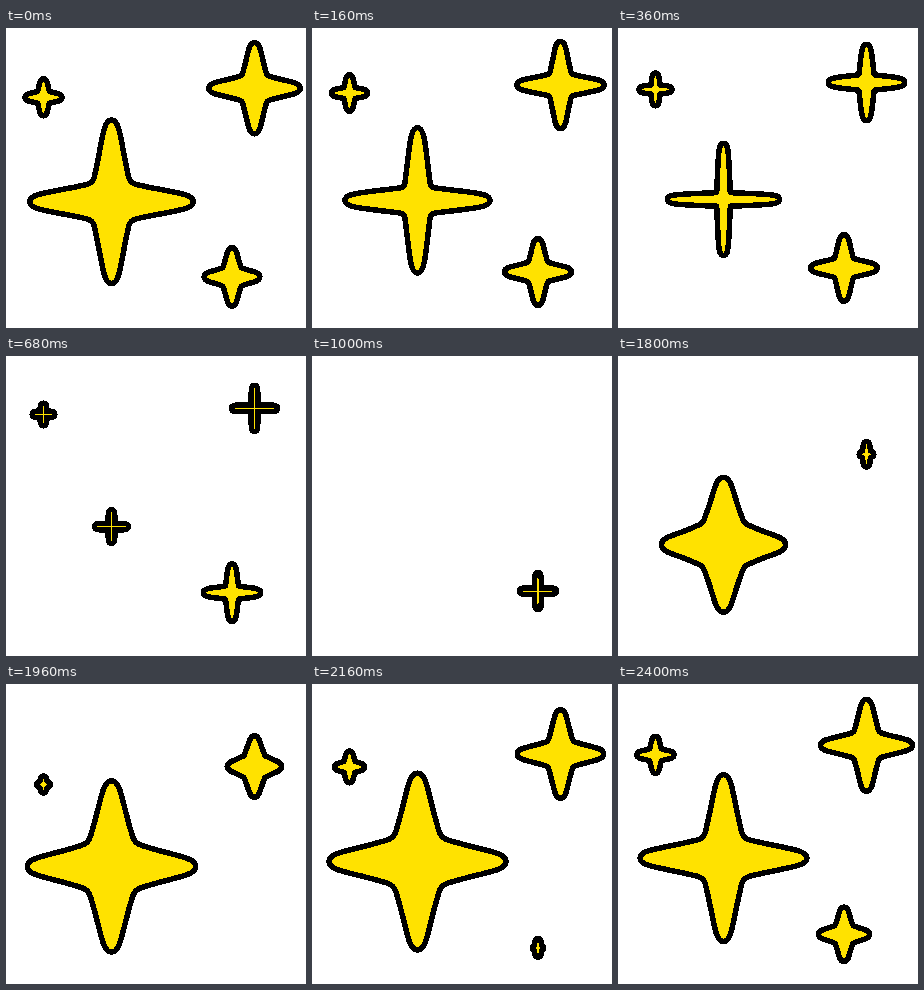
Write an HTML page that moves like this. It is 300x300 px and loops after 2.44 s.

```html
<!DOCTYPE html>
<html lang="en">
<head>
<meta charset="utf-8">
<title>Sparkles</title>
<style>
  html, body { margin: 0; width: 100%; height: 100%; overflow: hidden; background: #fff; }
  svg { display: block; width: 100%; height: 100%; }
  /* The outline lies behind the fill, so thin arms keep a yellow core */
  path {
    fill: #ffe200; stroke: #000; stroke-width: 11; stroke-linejoin: round;
    paint-order: stroke; shape-rendering: crispEdges;
  }
</style>
</head>
<body>
<svg id="stage" viewBox="0 0 300 300"></svg>
<script>
const LOOP = 2440, STEP = 40, LIFE = 1590, INSET = 2.75, THIN = 0.65;

// x, resting y, rise distance, full radius, birth time
const stars = [
  { x: 105.5, y: 170.5, rise: 36, size: 88.5, birth: 1540 },
  { x: 248.5, y: 51.5, rise: 54, size: 46, birth: 1750 },
  { x: 37.5, y: 57, rise: 60, size: 18.5, birth: 1840 },
  { x: 226, y: 234.5, rise: 34, size: 33.5, birth: 2110 }
];

const stage = document.getElementById('stage');
for (const star of stars) {
  star.el = document.createElementNS('http://www.w3.org/2000/svg', 'path');
  stage.append(star.el);
}

const clamp = (v, lo, hi) => Math.min(hi, Math.max(lo, v));

// Quick pop, short hold, then an accelerating shrink
function scaleAt(age) {
  if (age < 500) return 1 - (1 - age / 500) ** 1.65;
  return 1 - (Math.max(0, age - 600) / 1090) ** 2;
}

// Four-pointed star; q is the distance of the inner corners on each axis
function starPath(cx, cy, rx, ry, q) {
  const pt = (x, y) => (cx + x).toFixed(2) + ' ' + (cy + y).toFixed(2) + ' ';
  const slim = r => Math.max(THIN, q * clamp(0.7 - 1.4 * q / r, 0.4, 0.7));
  const ax = slim(rx), ay = slim(ry);
  const near = 0.88 * q, far = 1.45 * q;

  // sx, sy pick the quadrant
  const fromY = (sx, sy) =>
    'C' + pt(sx * 0.8 * ay, sy * ry) + pt(sx * ay, sy * 0.75 * ry) + pt(sx * near, sy * far) +
    'Q' + pt(sx * q, sy * q) + pt(sx * far, sy * near) +
    'C' + pt(sx * 0.75 * rx, sy * ax) + pt(sx * rx, sy * 0.8 * ax) + pt(sx * rx, 0);
  const fromX = (sx, sy) =>
    'C' + pt(sx * rx, sy * 0.8 * ax) + pt(sx * 0.75 * rx, sy * ax) + pt(sx * far, sy * near) +
    'Q' + pt(sx * q, sy * q) + pt(sx * near, sy * far) +
    'C' + pt(sx * ay, sy * 0.75 * ry) + pt(sx * 0.8 * ay, sy * ry) + pt(0, sy * ry);

  return 'M' + pt(0, -ry) + fromY(1, -1) + fromX(1, 1) + fromY(-1, 1) + fromX(-1, -1) + 'Z';
}

function draw(time) {
  for (const { x, y, rise, size, birth, el } of stars) {
    const age = (time - birth + LOOP) % LOOP;
    if (age >= LIFE) {
      el.setAttribute('d', '');
      continue;
    }
    const s = scaleAt(age);
    const stretch = 0.13 * Math.max(0, 1 - age / 480);
    const rx = Math.max(1.5, size * s - INSET);
    const ry = Math.max(1.5, size * (s + stretch) - INSET);
    const waist = 0.25 * size * s ** (age < 500 ? 0.4 : 3) - 1;
    const q = clamp(waist, THIN, Math.max(THIN, rx / 3));
    const lift = Math.exp(-age / 400) - 0.0166;
    el.setAttribute('d', starPath(x, y + rise * lift, rx, ry, q));
  }
}

let start;
function tick(now) {
  start ??= now;
  draw(Math.floor(((now - start) % LOOP) / STEP) * STEP);
  requestAnimationFrame(tick);
}
draw(0);
requestAnimationFrame(tick);
</script>
</body>
</html>
```
